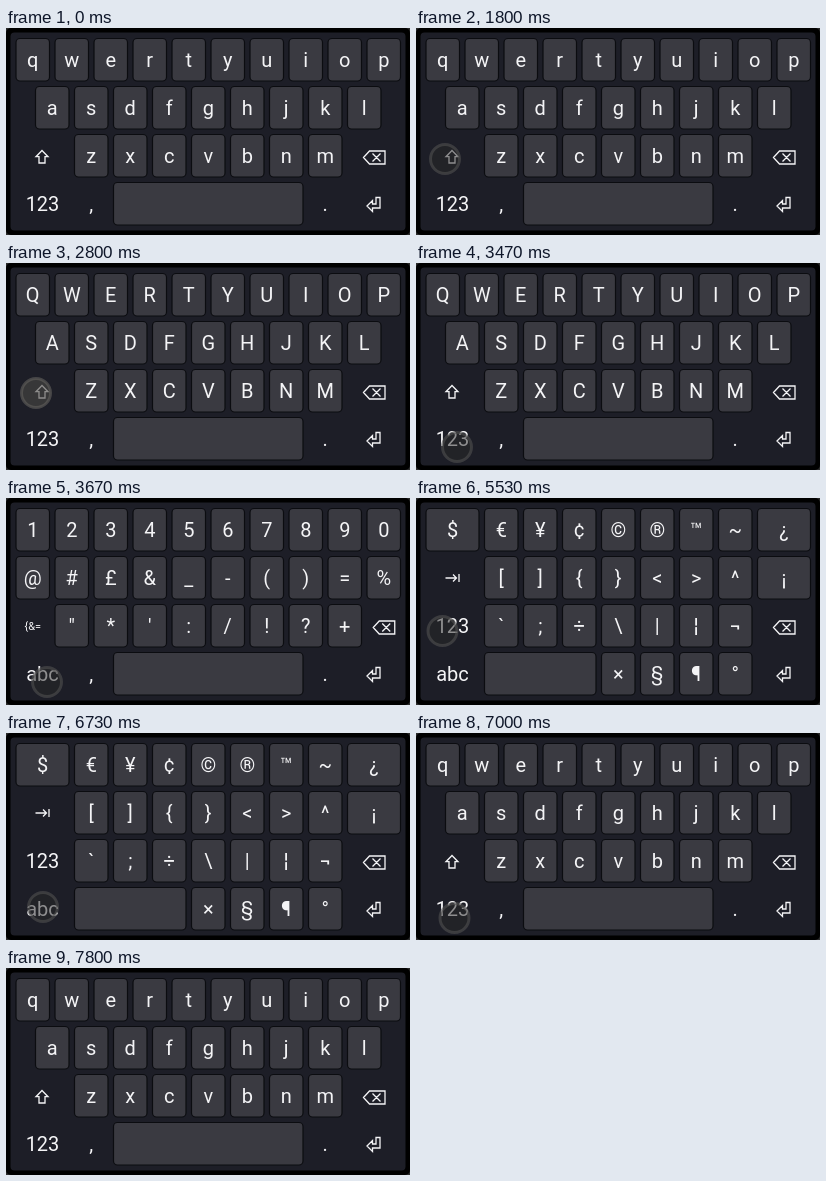
Animation, 404 px wide and 207 px high, one loop 8000 ms. Source, as an HTML page:

```html
<!DOCTYPE html>
<html lang="en">
<meta charset="utf-8">
<title>On-screen keyboard</title>
<style>
  html, body { margin: 0; width: 100%; height: 100%; overflow: hidden; background: #2b2b2b; }
  svg { display: block; }
  text { font: 20px Roboto, "DejaVu Sans", sans-serif; fill: #f4f4f6; text-anchor: middle; }
  .small { font-size: 11px; }
  .key { fill: #3a3a41; stroke: #0b0c10; stroke-width: 1.2; }
  .icon { fill: none; stroke: #f4f4f6; stroke-width: 1.3; }
  #dot { fill: rgba(40, 40, 40, .5); stroke: rgba(80, 80, 80, .6); stroke-width: 3; }
  #dot.down { fill: rgba(74, 71, 68, .6); stroke: rgba(98, 96, 94, .6); }
</style>
<svg width="404" height="207" viewBox="0 0 404 207">
  <rect width="404" height="207" rx="5"/>
  <rect x="4.5" y="4.5" width="395" height="198" rx="4" fill="#1d1e27"/>
  <g id="board"></g>
  <circle id="dot" r="14.5"/>
</svg>
<script>
const UNIT = 39, ROW = 48, GAP = 5.5;
const left = col => 10 + col * UNIT;
const center = (col, width) => left(col) + (width * UNIT - GAP) / 2;
const escape = s => s.replace(/&/g, '&amp;').replace(/</g, '&lt;');

const label = (row, col, s, width = 1) =>
  `<text x="${center(col, width)}" y="${39 + row * ROW}">${escape(s)}</text>`;
const key = (row, col, s, width = 1) =>
  `<rect class="key" x="${left(col)}" y="${10.5 + row * ROW}" width="${width * UNIT - GAP}" height="42.5" rx="4"/>` +
  label(row, col, s, width);
const keys = (row, col, chars) => [...chars].map((c, i) => key(row, col + i, c)).join('');

// Icon paths are relative to the middle of their key.
const icon = (row, col, width, d) =>
  `<path class="icon" transform="translate(${center(col, width)} ${32 + row * ROW})" d="${d}"/>`;
const shift = icon(2, 0, 1.5, 'M-.5-5.5L5.5.7H2.5V7H-3.5V.7H-6.5Z');
const tab = icon(1, 0, 1.5, 'M-7 0H4M.5-3.5L4 0L.5 3.5M6.5-4V4');
const erase = (col, width) =>
  icon(2, col, width, 'M-10.5 1.5L-4.5-5H11V8H-4.5ZM-1.5-2.5L6.5 5.5M6.5-2.5L-1.5 5.5');
const enter = icon(3, 8.5, 1.5, 'M-7 2L-1.5-3.5V0H2V-6.5H6V4H-1.5V7.5Z');

const bottom = mode => label(3, 0, mode, 1.5) + label(3, 1.5, ',') + key(3, 2.5, '', 5) + label(3, 7.5, '.') + enter;
const letters = s => keys(0, 0, s.slice(0, 10)) + keys(1, .5, s.slice(10, 19)) +
  shift + keys(2, 1.5, s.slice(19)) + erase(8.5, 1.5) + bottom('123');

const alphabet = 'qwertyuiopasdfghjklzxcvbnm';
const layouts = [
  letters(alphabet),
  letters(alphabet.toUpperCase()),
  keys(0, 0, '1234567890') + keys(1, 0, '@#£&_-()=%') +
    `<text class="small" x="${center(0, 1)}" y="132">${escape('{&=')}</text>` +
    keys(2, 1, `"*':/!?+`) + erase(9, 1) + bottom('abc'),
  key(0, 0, '$', 1.5) + keys(0, 1.5, '€¥¢©®™~') + key(0, 8.5, '¿', 1.5) +
    tab + keys(1, 1.5, '[]{}<>^') + key(1, 8.5, '¡', 1.5) +
    label(2, 0, '123', 1.5) + keys(2, 1.5, '`;÷\\|¦¬') + erase(8.5, 1.5) +
    label(3, 0, 'abc', 1.5) + key(3, 1.5, '', 3) + keys(3, 4.5, '×§¶°') + enter
];

const board = document.getElementById('board');
const dot = document.getElementById('dot');
board.innerHTML = layouts.map(s => `<g>${s}</g>`).join('');

// Times are in steps of 1/15 s: [step, layout] and [step, x, y].
const switches = [[0, 0], [31, 1], [55, 2], [83, 3], [105, 0]];
const path = [
  [27, 29, 131], [29, 30, 132], [41, 30, 132], [42, 30, 130], [44, 31, 135], [49, 39, 174], [52, 41, 184],
  [75, 41, 184], [76, 39, 181], [78, 36, 168], [81, 28, 139], [83, 26.5, 133],
  [92, 26.5, 133], [95, 28, 137], [96, 28, 137], [101, 37, 174], [103, 38.5, 185],
  [112, 38.5, 185], [117, 23, 225]
];

function draw(now) {
  const step = Math.floor((now % 8000) * .015 + .1) % 120;
  const current = switches.filter(s => s[0] <= step).pop()[1];
  [...board.children].forEach((g, i) => g.style.display = i === current ? '' : 'none');

  const next = path.findIndex(p => p[0] > step);
  dot.style.display = next > 0 ? '' : 'none';
  if (next > 0) {
    const a = path[next - 1], b = path[next];
    const f = (step - a[0]) / (b[0] - a[0]);
    dot.setAttribute('cx', a[1] + (b[1] - a[1]) * f);
    dot.setAttribute('cy', a[2] + (b[2] - a[2]) * f);
    dot.classList.toggle('down', step >= 31 && step < 45);
  }
}

let start;
function tick(now) {
  start ??= now;
  draw(now - start);
  requestAnimationFrame(tick);
}
draw(0);
requestAnimationFrame(tick);
</script>
</html>
```
